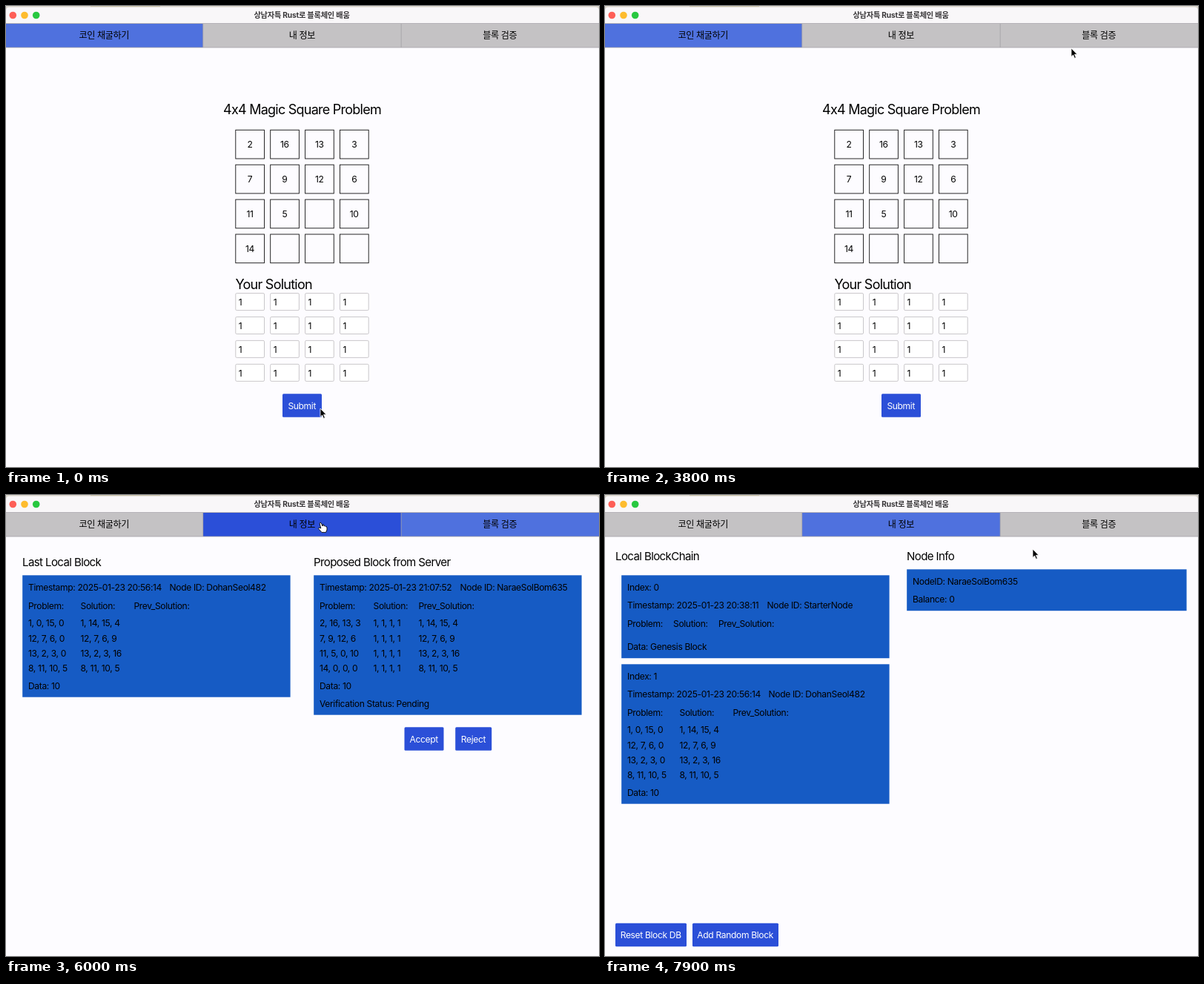
Animation of 800x622 px, one loop 8000 ms. Source, as an HTML page:

```html
<!DOCTYPE html>
<html lang="ko">
<head>
<meta charset="utf-8">
<title>4x4 Magic Square</title>
<style>
:root { --strong: #2b4fd8; --base: #4f71de; --off: #c4c2c4; }
html, body { margin: 0; width: 100%; height: 100%; overflow: hidden; background: #fdfcff; }
svg { display: block; width: 800px; height: 622px; }
text { font-family: Inter, "Noto Sans CJK KR", "Noto Sans CJK", sans-serif; letter-spacing: -.03em; white-space: pre; }
.h { letter-spacing: -.042em; }
.title { font-weight: 700; letter-spacing: -.02em; fill: #3a383a; }
.btn rect, #submit { fill: var(--strong); }
.btn text { fill: #fff; }
.cell { fill: none; stroke: #111; stroke-width: .9; }
.input { fill: #fff; stroke: #c3c1c5; stroke-width: .9; }
.card { fill: #165bc4; }

#mine, #info, #verify, .tab, #submit, #arrow, #hand { animation: 8s step-end infinite; }
#mine { animation-name: mine; }
#verify { animation-name: verify; }
#info { animation-name: info; }
#tab0 { animation-name: tab0; }
#tab1 { animation-name: tab1; }
#tab2 { animation-name: tab2; }
#submit { animation-name: submit; }
#arrow { animation-name: arrow; }
#hand { animation-name: hand; }
#cursor { animation: move 8s linear infinite; }

@keyframes mine { 0% { opacity: 1 } 52.5%, 100% { opacity: 0 } }
@keyframes verify { 0% { opacity: 0 } 52.5% { opacity: 1 } 76.25%, 100% { opacity: 0 } }
@keyframes info { 0% { opacity: 0 } 76.25%, 100% { opacity: 1 } }
@keyframes tab0 { 0% { fill: var(--base) } 52.5%, 100% { fill: var(--off) } }
@keyframes tab1 { 0% { fill: var(--off) } 72.5% { fill: var(--strong) } 82.5%, 100% { fill: var(--base) } }
@keyframes tab2 { 0% { fill: var(--off) } 48.75% { fill: var(--strong) } 58.75% { fill: var(--base) } 76.25%, 100% { fill: var(--off) } }
@keyframes submit { 0% { fill: var(--strong) } 5% { fill: var(--base) } 33.75%, 100% { fill: var(--strong) } }
@keyframes hand {
  0%, 33.75%, 58.75%, 82.5%, 100% { opacity: 0 }
  5%, 48.75%, 72.5% { opacity: 1 }
}
@keyframes arrow {
  0%, 33.75%, 58.75%, 82.5%, 100% { opacity: 1 }
  5%, 48.75%, 72.5% { opacity: 0 }
}
@keyframes move {
  0% { transform: translate(424px, 543px); animation-timing-function: step-end }
  5% { transform: translate(412px, 539px); animation-timing-function: step-end }
  7.5% { transform: translate(402px, 536px); animation-timing-function: steps(4) }
  12.5% { transform: translate(380px, 530px); animation-timing-function: step-end }
  32.5% { transform: translate(380px, 530px); animation-timing-function: steps(2) }
  35% { transform: translate(432px, 425px); animation-timing-function: steps(4) }
  40% { transform: translate(577px, 150px); animation-timing-function: steps(3) }
  43.75% { transform: translate(626px, 72px); animation-timing-function: steps(3) }
  47.5% { transform: translate(629px, 57px); animation-timing-function: steps(2) }
  50% { transform: translate(623px, 41px); animation-timing-function: step-end }
  57.5% { transform: translate(623px, 41px); animation-timing-function: steps(3) }
  61.25% { transform: translate(548px, 152px); animation-timing-function: steps(2) }
  63.75% { transform: translate(540px, 169px); animation-timing-function: steps(3) }
  67.5% { transform: translate(534px, 172px); animation-timing-function: steps(4) }
  72.5% { transform: translate(430px, 50px); animation-timing-function: steps(2) }
  75% { transform: translate(424px, 37px); animation-timing-function: step-end }
  80% { transform: translate(424px, 37px); animation-timing-function: steps(3) }
  83.75% { transform: translate(402px, 84px); animation-timing-function: steps(3) }
  87.5% { transform: translate(372px, 150px); animation-timing-function: steps(5) }
  93.75% { transform: translate(425px, 145px); animation-timing-function: steps(2) }
  96.25% { transform: translate(475px, 118px); animation-timing-function: steps(2) }
  98.75%, 100% { transform: translate(577px, 73px); animation-timing-function: step-end }
}
</style>
</head>
<body>
<svg id="stage" viewBox="0 0 800 622"></svg>
<script>
const S = 12.1, M = 15.1, L = 18;

// Text is placed by its vertical centre line.
const text = (x, y, s, size = S, attrs = '') =>
  `<text x="${x}" y="${y + size * .36}" font-size="${size}" ${attrs}>${s}</text>`;
const mid = 'text-anchor="middle"';
const rect = (x, y, w, h, attrs = '') =>
  `<rect x="${x}" y="${y}" width="${w}" height="${h}" ${attrs}/>`;
const button = (x, y, w, label, id = '') =>
  `<g class="btn">${rect(x, y, w, 31.6, `rx="1.5" ${id}`)}${text(x + w / 2 - .3, y + 16, label, S, mid)}</g>`;
const heading = (x, y, s, size = M) => text(x, y, s, size, 'class="h"');

const column = (x, y, rows) => rows.map((r, i) => text(x, y + i * 20.2, r)).join('');

function card(x, y, w, h, lines) {
  return rect(x + .2, y + .3, w - .6, h - .6, 'class="card"') +
    lines.map(([dx, dy, s]) => text(x + dx, y + dy, s)).join('');
}

// Timestamp, node and the three labelled columns shared by all blocks.
function header(y, time, nodeX, node, cols) {
  const labels = ['Problem:', 'Solution:', 'Prev_Solution:'];
  return [
    [8, y, 'Timestamp: 2025-01-23 ' + time],
    [nodeX, y, 'Node ID: ' + node],
    ...labels.map((s, i) => [cols[i], y + 24.2, s])
  ];
}

const miner = 'DohanSeol482', me = 'NaraeSolBom635', first = 'StarterNode';
const solved = ['1, 14, 15, 4', '12, 7, 6, 9', '13, 2, 3, 16', '8, 11, 10, 5'];
const given = ['1, 0, 15, 0', '12, 7, 6, 0', '13, 2, 3, 0', '8, 11, 10, 5'];
const puzzle = [2, 16, 13, 3, 7, 9, 12, 6, 11, 5, 0, 10, 14, 0, 0, 0];
const puzzleRows = [0, 4, 8, 12].map(i => puzzle.slice(i, i + 4).join(', '));

function minePage() {
  let out = text(399.5, 139.5, '4x4 Magic Square Problem', L, 'class="h" ' + mid) +
    heading(309.5, 375.5, 'Your Solution', L);
  puzzle.forEach((n, i) => {
    const x = 309.8 + (i % 4) * 46.9, row = Math.floor(i / 4);
    const y = 167.3 + row * 46.9, inY = 387.6 + row * 31.9;
    out += rect(x, y, 38.7, 38.7, 'class="cell"') +
      (n ? text(x + 19.2, y + 19.6, n, S, mid) : '') +
      rect(x, inY, 38.7, 23, 'class="input" rx="1.5"') + text(x + 4, inY + 12, 1);
  });
  return out + button(373, 523.2, 53, 'Submit', 'id="submit"');
}

function verifyPage() {
  return heading(22, 90.5, 'Last Local Block') +
    card(22, 108, 362, 165, [
      ...header(17, '20:56:14', 198.5, miner, [8, 78.5, 150.5]), [8, 149.5, 'Data: 10']
    ]) +
    column(30, 173, given) + column(100.5, 173, solved) +
    heading(415, 90.5, 'Proposed Block from Server') +
    card(415, 108, 362, 189, [
      ...header(17, '21:07:52', 197.5, me, [8, 80.5, 141.5]),
      [8, 149.5, 'Data: 10'], [8, 174, 'Verification Status: Pending']
    ]) +
    column(423, 173, puzzleRows) + column(495.5, 173, Array(4).fill('1, 1, 1, 1')) +
    column(556.5, 173, solved) +
    button(537.5, 313.2, 53, 'Accept') + button(606.2, 313.2, 49, 'Reject');
}

function infoPage() {
  return heading(14, 83, 'Local BlockChain') +
    card(22, 108, 362, 112.5, [
      [8, 17, 'Index: 0'], ...header(41, '20:38:11', 196.5, first, [8, 70, 131]),
      [8, 97, 'Data: Genesis Block']
    ]) +
    card(22, 228, 362, 189, [
      [8, 17, 'Index: 1'], ...header(41, '20:56:14', 198.5, miner, [8, 78.5, 150.5]),
      [8, 173.5, 'Data: 10']
    ]) +
    column(30, 317, given) + column(100.5, 317, solved) +
    heading(407, 83, 'Node Info') +
    card(407, 100, 378, 56.5, [[8, 17, 'NodeID: ' + me], [8, 41, 'Balance: 0']]) +
    button(14, 577.7, 96, 'Reset Block DB') + button(118, 577.7, 116, 'Add Random Block');
}

function chrome() {
  const lights = ['#fe5f57', '#febc2e', '#28c840'];
  const tabs = ['코인 채굴하기', '내 정보', '블록 검증'];
  return rect(0, 0, 800, 6, 'fill="#dbd6cc"') + rect(114, 0, 94, 1.4, 'fill="#c9c0a8"') +
    '<path d="M0 24V6Q0 1.5 5 1.5H795Q800 1.5 800 6V24Z" fill="#f9f7f9"/>' +
    lights.map((c, i) => `<circle cx="${9.3 + i * 15.7}" cy="12.5" r="4.8" fill="${c}"/>`).join('') +
    text(399, 12.5, '상남자특 Rust로 블록체인 배움', 10.2, 'class="title" ' + mid) +
    tabs.map((s, i) => {
      const x = i * 267 - 1;
      return rect(x, 24, 267, 32, `class="tab" id="tab${i}"`) +
        text(x + 133.3, 39.5, s, S, mid);
    }).join('') +
    '<path d="M0 23.5H800M0 56H800M265.7 24V56M533.2 24V56" fill="none" stroke="#a5a3a8" stroke-width=".8"/>';
}

const cursor = `<g id="cursor">
  <path id="arrow" d="M0 0V11.4L2.6 9L4.5 13.4L6.4 12.6L4.5 8.3H8Z" fill="#000" stroke="#fff" stroke-width=".8"/>
  <path id="hand" d="M-1 1.2Q0-.6 1.4 1L3 5Q4-.1 5.2 5Q6.4 4 7.2 5.6Q8.6 5 9 7V10L7.6 13.4H2L-2.6 8.4Q-2.4 6.6-.6 7.4L.8 8Z"
    fill="#fff" stroke="#000" stroke-width=".9" stroke-linejoin="round"/>
</g>`;

document.getElementById('stage').innerHTML = chrome() +
  `<g id="mine">${minePage()}</g><g id="verify">${verifyPage()}</g><g id="info">${infoPage()}</g>` + cursor;
</script>
</body>
</html>
```
